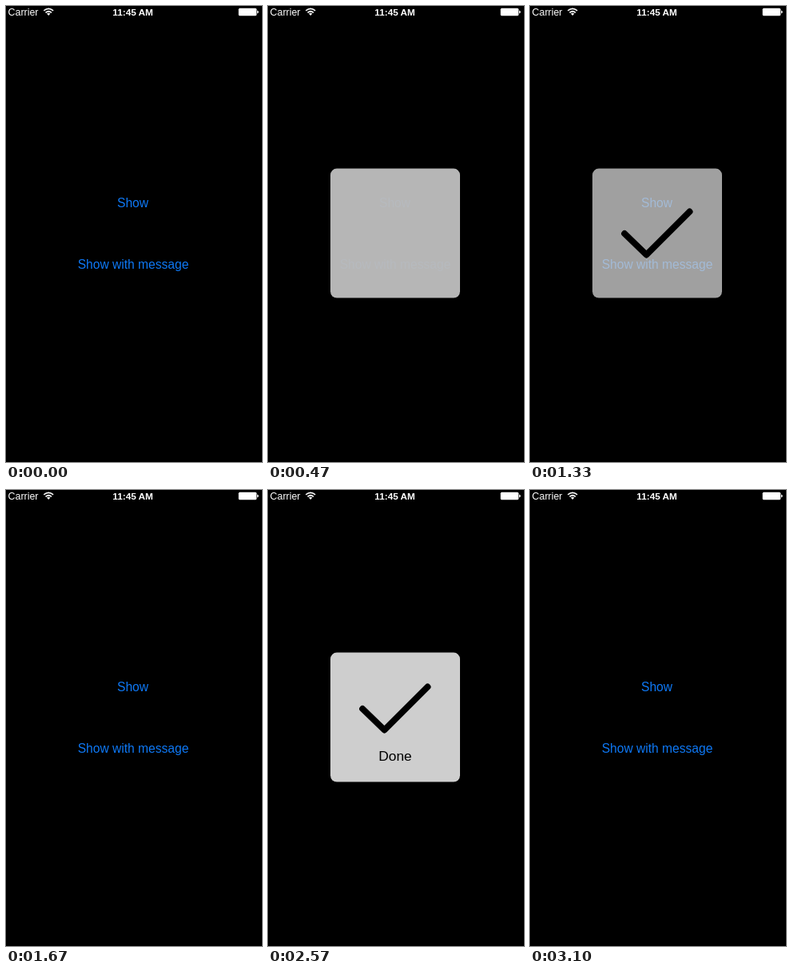
Animation, 320 px wide and 571 px high, one loop 3130 ms. Source, as an HTML page:

```html
<!DOCTYPE html>
<html lang="en">
<head>
<meta charset="utf-8">
<title>Done panel</title>
<style>
  html, body { margin: 0; width: 100%; height: 100%; overflow: hidden; background: #000; }
  svg { display: block; width: 100%; height: 100%; }
  text { font-family: "Liberation Sans", Arial, sans-serif; }
  .bar { fill: #fff; }
  .button { fill: #0e78f5; font-size: 15.6px; text-anchor: middle; }
  .arc { fill: none; stroke: #fff; stroke-width: 1.7; }
  #panel { opacity: 0; }
  #check {
    fill: none; stroke: #000; stroke-width: 8;
    stroke-linecap: round; stroke-linejoin: round;
    stroke-dasharray: 1 2;
  }
</style>
</head>
<body>
<svg viewBox="0 0 320 571">
  <rect width="320" height="571"/>

  <g class="bar">
    <text x="2.6" y="12" font-size="12.4">Carrier</text>
    <text x="158.6" y="11.7" font-size="11.8" font-weight="bold" text-anchor="middle">11:45 AM</text>
    <path class="arc" d="M47.3 5.9Q53.2 .9 59.1 5.9M49.5 8.3Q53.2 5.2 56.9 8.3"/>
    <path d="M51 9.6Q53.2 8 55.4 9.6L53.2 12Z"/>
    <rect x="290.7" y="2.7" width="22.6" height="9.6" rx="1.6"/>
    <path d="M314 5.6Q315.7 6 315.7 7.5T314 9.4Z"/>
  </g>

  <text class="button" x="158.5" y="252">Show</text>
  <text class="button" x="159" y="329">Show with message</text>

  <g id="panel">
    <rect id="plate" x="78" y="203.6" width="162" height="162" rx="8"/>
    <path id="check" pathLength="1" d="M118.2 285L145.5 311.5L199.5 257.5"/>
    <text id="label" x="159" y="339" font-size="17.4" text-anchor="middle">Done</text>
  </g>
</svg>
<script>
  const LOOP = 3130;
  const FADE_IN = 500, FADE_OUT = 250, DRAW = 300;
  const SHOWS = [
    { start: 30, hide: 1250 },
    { start: 1730, hide: 2850 }
  ];

  // steps: [time in ms, value, easing to the next]; repeated times make hard changes
  function play(id, prop, steps) {
    const all = [[0, steps[0][1]], ...steps, [LOOP, steps[steps.length - 1][1]]];
    const frames = all.map(([t, v, easing = "linear"]) => ({ offset: t / LOOP, [prop]: v, easing }));
    document.getElementById(id).animate(frames, { duration: LOOP, iterations: Infinity });
  }

  const each = fn => SHOWS.flatMap(fn);
  const cut = (t, a, b) => [[t, a], [t, b]];
  const drawAt = s => s.start + FADE_IN + 10;
  const swap = SHOWS[1].start;

  play("panel", "opacity", each(s => [
    [s.start, 0, "ease-in-out"], [s.start + FADE_IN, 1],
    [s.hide, 1, "ease-in-out"], [s.hide + FADE_OUT, 0]
  ]));

  // the plate brightens once the blur behind it settles
  const DIM = "rgb(188,188,188)", BRIGHT = "rgb(206,206,206)";
  play("plate", "fill", each(s => [
    ...cut(s.start, BRIGHT, DIM),
    [s.start + FADE_IN - 50, DIM], [s.start + FADE_IN, BRIGHT]
  ]));

  play("check", "strokeDashoffset", each(s => [
    ...cut(s.start, 0, 1), [drawAt(s), 1], [drawAt(s) + DRAW, 0]
  ]));
  play("check", "opacity", each(s => [
    ...cut(s.start, 1, 0), ...cut(drawAt(s), 0, 1)
  ]));
  play("check", "transform", cut(swap, "translate(0px, 0px)", "translate(0px, -11px)"));
  play("label", "opacity", cut(swap, 0, 1));
</script>
</body>
</html>
```
